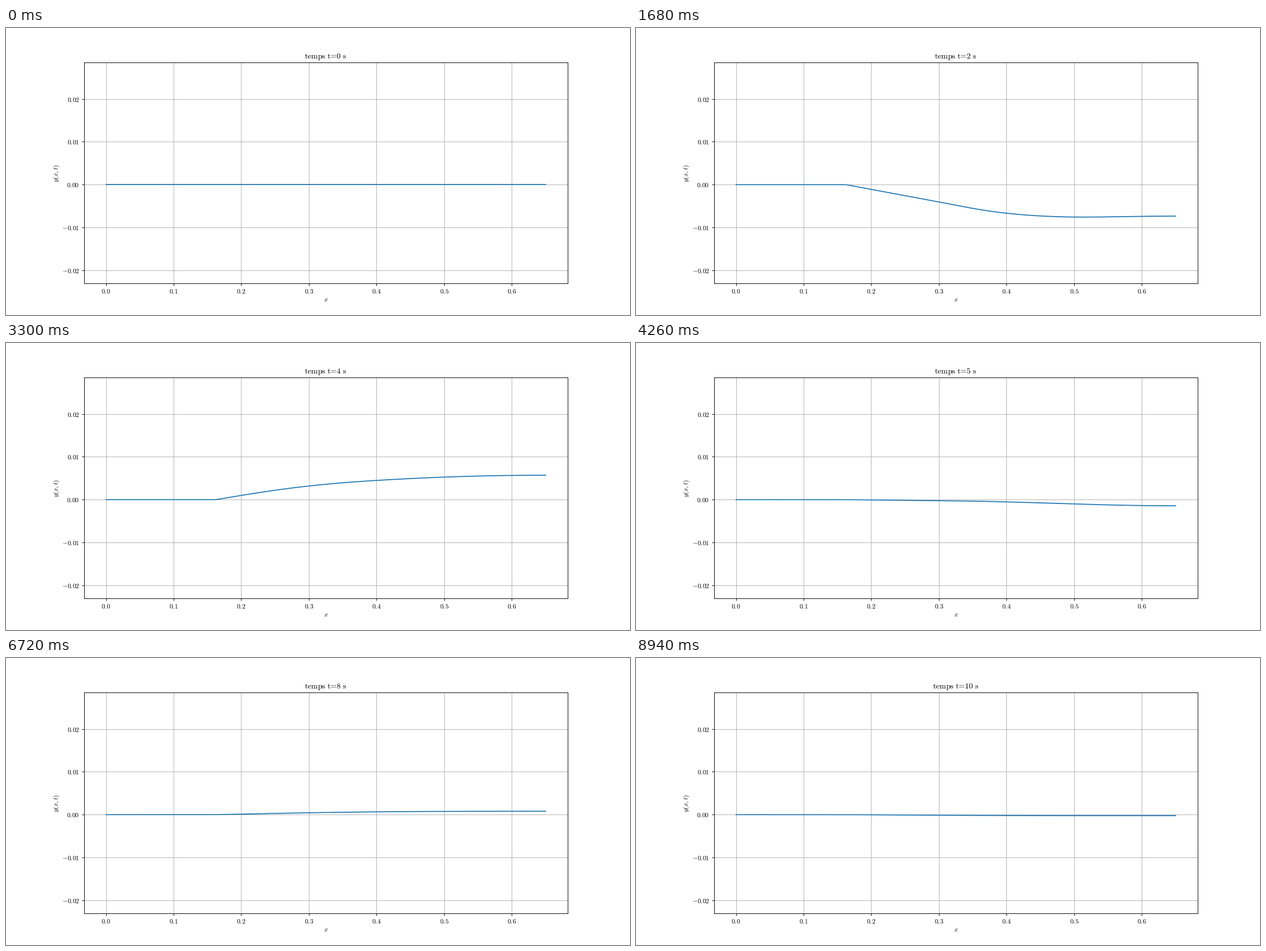
A matplotlib script that plays this animation: 1102 by 508 pixels, repeating every 9000 ms.

```python
import numpy as np
import matplotlib
import matplotlib.pyplot as plt
from matplotlib.animation import FuncAnimation

W, H, DPI = 1102, 508, 64
FRAMES, INTERVAL, T_END = 150, 60, 10.0


def px(v):
    """Pixels to points."""
    return v * 72 / DPI


matplotlib.rcParams.update({"mathtext.fontset": "cm"})

# String clamped up to X0, free at X1; a steady pull on the free end until T_OFF.
X0, X1 = 0.1625, 0.65
LENGTH = X1 - X0
SPEED, SLOPE, T_OFF = 3.035, 0.0318, 1.0
MODES = 60

n = np.arange(1, MODES + 1)
k = (n - 0.5) * np.pi / LENGTH
step = LENGTH / MODES
omega = np.sqrt((2 * SPEED / step * np.sin(k * step / 2)) ** 2 - 5.1)
static = 2 * SLOPE * (-1.0) ** (n + 1) / (LENGTH * k**2)
loss = 6e-5 * omega**2
pulled = 1j * omega - loss - 0.1
free = 1j * omega - loss - 0.45

x = np.concatenate([[0], np.linspace(X0, X1, 400)])
shapes = np.sin(np.outer(x - X0, k))
shapes[0] = 0


def height(t):
    if t <= T_OFF:
        q = static * (1 - np.exp(pulled * t))
    else:
        q = static * (1 - np.exp(pulled * T_OFF)) * np.exp(free * (t - T_OFF))
    return shapes @ q.real


fig = plt.figure(figsize=(W / DPI, H / DPI), dpi=DPI, facecolor="white")
ax = fig.add_axes([0.125, 0.11, 0.775, 0.77])
ax.set_xlim(-0.0325, 0.6825)
ax.set_ylim(-0.02305, 0.02852)

xticks = np.arange(7) / 10
yticks = np.arange(-2, 3) / 100
ax.set_xticks(xticks, [f"${v:.1f}$" for v in xticks])
ax.set_yticks(yticks, [f"${v:.2f}$" for v in yticks])
ax.tick_params(labelsize=px(11.6), length=px(4.06), pad=px(4.06), width=px(0.93))
ax.grid(color="#b0b0b0", linewidth=px(0.93))
for spine in ax.spines.values():
    spine.set_linewidth(px(0.93))

label = dict(fontsize=px(11.6), ha="center", va="center")
fig.text(565 / W, 1 - 480.5 / H, "$x$", **label)
fig.text(89 / W, 1 - 257 / H, "$y(x,t)$", rotation=90, **label)
title = ax.set_title("", fontsize=px(13.9), pad=px(7))
(line,) = ax.plot(x, 0 * x, color="#1f77b4", linewidth=px(1.74))


def update(i):
    t = i * T_END / (FRAMES - 1)
    line.set_ydata(height(t))
    title.set_text(
        rf"$\mathrm{{temps\ t\hspace{{-0.2}}=\hspace{{-0.2}}{round(t)}\ s}}$"
    )
    return line, title


anim = FuncAnimation(fig, update, frames=FRAMES, interval=INTERVAL,
                     repeat=True, repeat_delay=0, blit=False)
plt.show()
```
